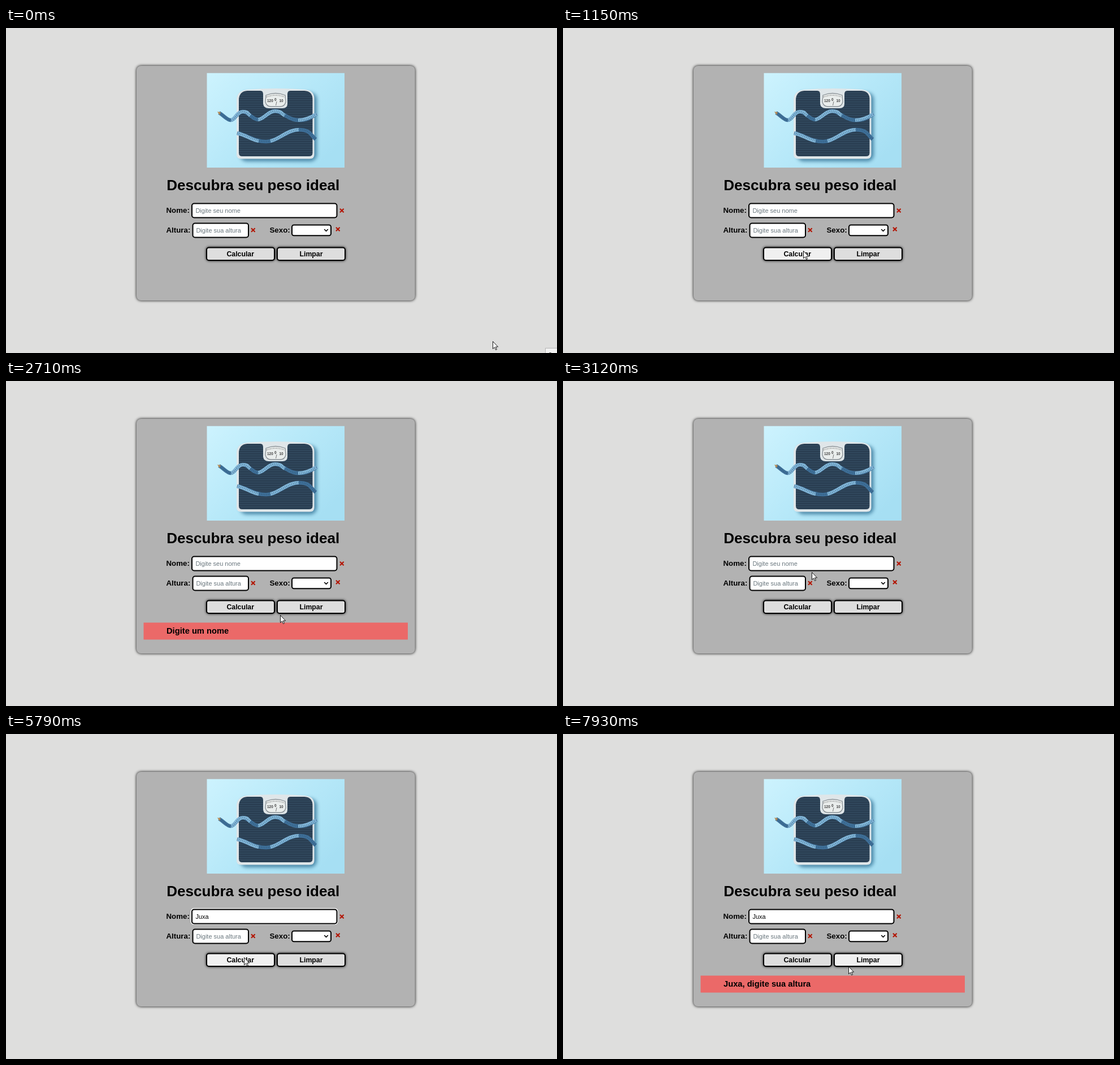
These frames come from a looping animation (975 by 575 pixels, 8000 ms). An HTML page:

```html
<!DOCTYPE html>
<html lang="pt">
<head>
<meta charset="utf-8">
<title>Peso ideal</title>
<style>
  html, body { margin: 0; width: 100%; height: 100%; overflow: hidden; background: #dededd; }
  svg { display: block; width: 100vw; height: 100vh; }
  text { font-family: "Liberation Sans", Arial, sans-serif; white-space: pre; }
  .label { font-weight: 700; font-size: 13.3px; }
  .field { font-size: 11px; }
  .hint { fill: #6a777e; }
  .box { fill: #fff; stroke: #000; stroke-width: 2; }
  .button rect { fill: #dedede; stroke: #000; stroke-width: 2; filter: drop-shadow(0 0 2px rgba(0,0,0,.9)); }
  .button.hover rect { fill: #f0f0f0; }
  .button text { font-weight: 700; font-size: 12.3px; text-anchor: middle; }
  .cross { stroke: #b31503; stroke-width: 2.1; }
  .tape { fill: none; stroke: #3f7099; stroke-width: 6.5; stroke-linejoin: round; }
  .shine { fill: none; stroke: #82b6d8; stroke-width: 6; }
  .ticks { fill: none; stroke: #28506f; stroke-width: 3; stroke-dasharray: .8 2.4; opacity: .7; }
</style>
</head>
<body>
<svg viewBox="0 0 975 575">
  <defs>
    <linearGradient id="sky" x2="1" y2=".7">
      <stop stop-color="#cdf3fe"/><stop offset=".5" stop-color="#b8e9f9"/><stop offset="1" stop-color="#a6dff3"/>
    </linearGradient>
    <pattern id="ribs" width="4" height="4" patternUnits="userSpaceOnUse">
      <rect width="4" height="4" fill="#30475c"/><rect width="4" height="1.4" fill="#26394c"/>
    </pattern>
    <path id="tapeTop" d="M377 150C386 155 391 163 398 163S409 148 419 148 436 162 446 162 464 147 476 147 500 163 517 163 538 159 550 152"/>
    <path id="tapeLow" d="M409 186C428 190 440 201 460 201S498 180 518 180 538 188 548 197"/>
    <clipPath id="photo"><rect x="355.5" y="79.7" width="243.5" height="167.3"/></clipPath>
  </defs>

  <rect width="975" height="575" fill="#dededd"/>
  <g id="corner">
    <rect x="954.5" y="566.5" width="22" height="10" fill="#f1f1f1" stroke="#b5b5b5"/>
    <path d="M961 575Q963 573.5 965 575" fill="none" stroke="#555"/>
  </g>
  <rect x="231" y="67" width="492.7" height="415" rx="8" fill="#b2b2b2" style="filter:drop-shadow(0 0 2.6px #000)"/>

  <g clip-path="url(#photo)">
    <rect x="355" y="79" width="245" height="169" fill="url(#sky)"/>
    <rect x="414" y="114" width="136" height="122" rx="12" fill="#2c6c90" opacity=".75" style="filter:blur(3px)"/>
    <path d="M426 109Q478 105 530 109Q545.5 111 545.5 125V224Q545.5 231.5 537 231.5H417Q408 231.5 408 224V125Q410 111 426 109Z" fill="#dfe6e9"/>
    <path d="M427 111H450Q455 111 455 117V134Q456 142 465 142H489Q498 142 498 134V117Q498 111 503 111H528Q542.5 112 542.5 126V221Q542.5 227 536 227H418Q412 227 412 221V126Q413 112 427 111Z" fill="url(#ribs)"/>
    <path d="M460 119Q477 112 494 119L495 131Q493 139 485 139H469Q461 139 459 131Z" fill="#e9edec" stroke="#8a9196" stroke-width="1.3"/>
    <path d="M461 122Q477 116 493 122" fill="none" stroke="#666" stroke-width="2" stroke-dasharray=".7 1.8"/>
    <g font-size="6.5" font-weight="700" fill="#444">
      <text x="462" y="131">120</text><text x="475" y="128.5">0</text><text x="483.5" y="131">10</text>
    </g>
    <path d="M477.5 137L479 130" stroke="#777"/>
    <use href="#tapeTop" class="tape"/><use href="#tapeLow" class="tape"/>
    <path class="shine" d="M398 163C404 163 409 148 419 148S427 151 432 155M446 162C455 162 464 147 476 147S487 151 493 155M517 163C526 163 538 159 550 152M409 186C424 189 434 198 447 200M468 200C485 196 498 180 518 180"/>
    <use href="#tapeTop" class="ticks"/><use href="#tapeLow" class="ticks"/>
    <path d="M374 148L380 149 378 154Z" fill="#b58a55"/>
  </g>

  <text x="284.2" y="287" font-size="26.1" font-weight="700">Descubra seu peso ideal</text>

  <text class="label" x="283.5" y="326.5">Nome:</text>
  <rect id="ring" x="327.3" y="308.7" width="259.6" height="28" rx="5" fill="none" stroke="#fff" stroke-width="1.2"/>
  <rect class="box" x="329" y="310.5" width="256.5" height="25" rx="4"/>
  <text id="name" class="field" x="335.4" y="327"></text>
  <rect id="caret" y="317" width="1" height="12"/>

  <text class="label" x="283.5" y="361.5">Altura:</text>
  <rect class="box" x="330.5" y="345.5" width="98.5" height="25" rx="4"/>
  <text class="field hint" x="336.4" y="362">Digite sua altura</text>

  <text class="label" x="466.5" y="361.5">Sexo:</text>
  <rect class="box" x="506" y="348.5" width="69" height="18.7" rx="3.5"/>
  <path d="M563.2 356L566.5 359.3 569.8 356" fill="none" stroke="#000" stroke-width="1.6"/>

  <g class="cross">
    <path id="x" d="M591 319.7L597.6 326.3M597.6 319.7L591 326.3"/>
    <use href="#x" x="-157" y="34.5"/><use href="#x" x="-7" y="33"/>
  </g>

  <g id="calc" class="button"><rect x="355" y="388.5" width="120" height="22.5" rx="4"/><text x="414.7" y="404">Calcular</text></g>
  <g id="clear" class="button"><rect x="480" y="388.5" width="120" height="22.5" rx="4"/><text x="540" y="404">Limpar</text></g>

  <g id="bar">
    <rect x="243.5" y="427.5" width="467.5" height="30" fill="#eb6968"/>
    <text id="message" x="284" y="447" font-size="14.7" font-weight="700"></text>
  </g>

  <g id="pointer">
    <path id="arrow" d="M.5 .5V13.6L3.5 10.8 5.6 15.5 7.5 14.7 5.5 10.1H9.6Z" fill="#fff" stroke="#000" stroke-width=".9"/>
    <path id="beam" d="M-3 -6.2H-.7L0 -5.5 .7 -6.2H3M0 -5.5V5.5M-3 6.2H-.7L0 5.5 .7 6.2H3" fill="none" stroke="#222"/>
  </g>
</svg>
<script>
const LOOP = 8000, TICK = 1000 / 15;
const NAME = "Juxa", ADVANCE = 6.2;
const KEY_TIMES = [4270, 4450, 4850, 5050];

// time, x, y of the pointer tip
const PATH = [
  [0, 861, 554], [400, 640, 478], [670, 497, 420], [740, 484, 400], [800, 470, 383],
  [870, 427, 374], [940, 426, 389], [1150, 425, 394], [1530, 425, 394], [1950, 362, 454.5],
  [2090, 362, 454.5], [2500, 440, 434], [2780, 515, 400], [2910, 513, 396], [2980, 495, 378],
  [3140, 438, 336], [3390, 434, 324], [3600, 433, 322], [5310, 433, 322], [5790, 421, 395],
  [6330, 421, 395], [6600, 294, 435], [6700, 283, 446], [6800, 315, 452], [6880, 370, 454],
  [7020, 474, 449], [7160, 403, 447], [7600, 490, 418], [7930, 505, 410.5], [LOOP, 505, 410.5]
];

const el = id => document.getElementById(id);
const show = (id, on) => { el(id).style.display = on ? "" : "none"; };
const between = (v, a, b) => v >= a && v < b;
const inside = ([x, y], l, t, r, b) => between(x, l, r) && between(y, t, b);

function pointerAt(t) {
  const i = Math.max(1, PATH.findIndex(p => p[0] > t));
  const [t0, x0, y0] = PATH[i - 1], [t1, x1, y1] = PATH[i];
  const k = (t - t0) / (t1 - t0);
  return [x0 + (x1 - x0) * k, y0 + (y1 - y0) * k];
}

function draw(t) {
  const tick = Math.min(LOOP - 1, Math.floor((t + 20) / TICK) * TICK);
  const tip = pointerAt(tick);
  const typed = KEY_TIMES.filter(k => t >= k).length;
  const first = between(t, 1350, 2910), second = t >= 5990;

  show("corner", t < 70);
  show("ring", between(t, 3520, 5990));
  show("caret", between(t, 3520, 4000) || between(t, 4270, 5550));
  el("caret").setAttribute("x", Math.floor(335.4 + typed * ADVANCE));
  el("name").textContent = typed ? NAME.slice(0, typed) : "Digite seu nome";
  el("name").classList.toggle("hint", !typed);

  show("bar", first || second);
  el("message").textContent = first ? "Digite um nome" : NAME + ", digite sua altura";

  el("calc").classList.toggle("hover", inside(tip, 354, 387, 476, 412));
  el("clear").classList.toggle("hover", inside(tip, 479, 387, 601, 412));

  const overText = inside(tip, 329, 311, 585, 335) || (second && inside(tip, 284, 432, 438, 451));
  show("beam", overText);
  show("arrow", !overText);
  el("pointer").setAttribute("transform", `translate(${tip.map(v => Math.round(v))})`);
}

const start = performance.now();
function frame() {
  draw((performance.now() - start) % LOOP);
  requestAnimationFrame(frame);
}
frame();
</script>
</body>
</html>
```
